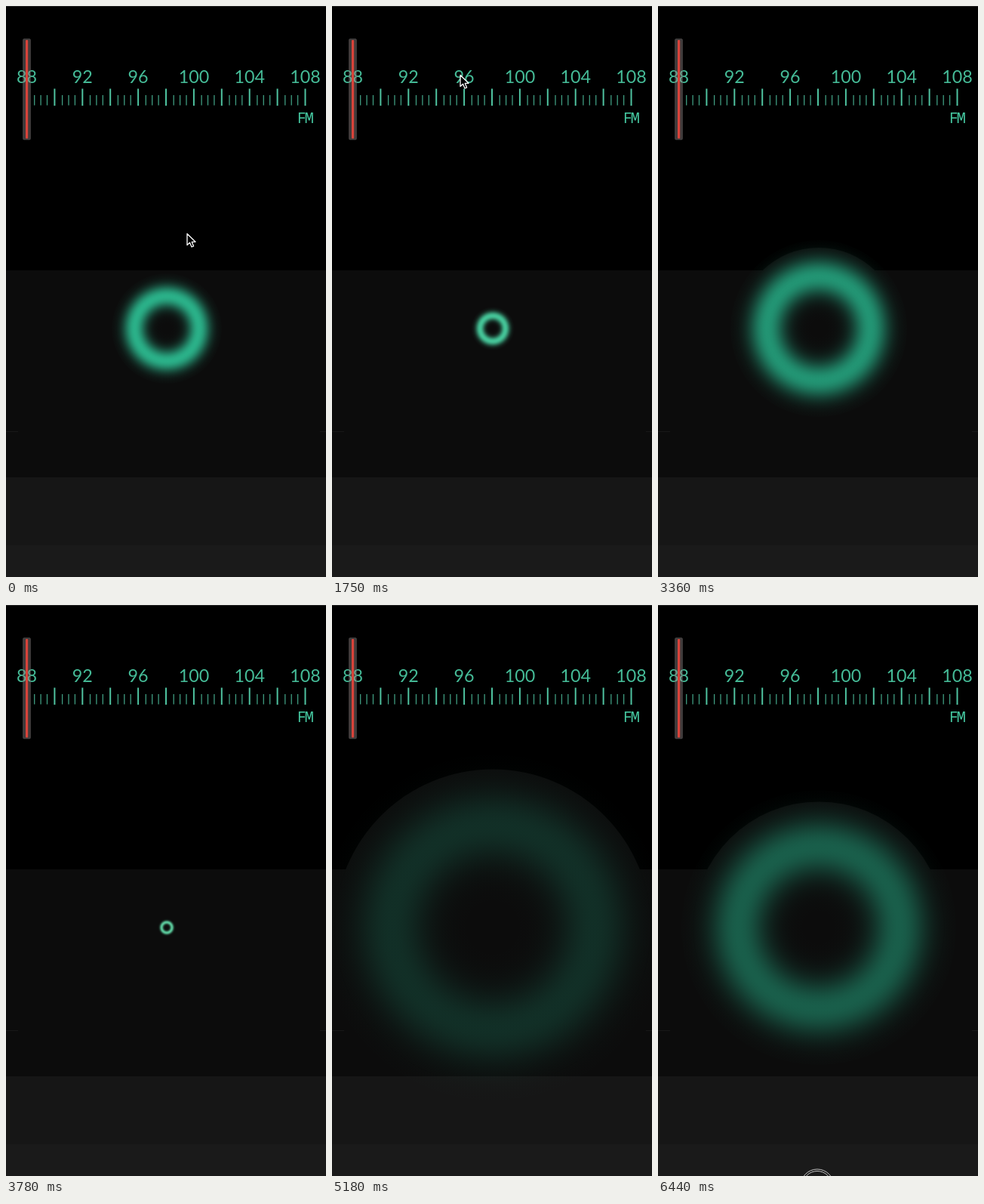
An HTML page that plays this animation: 424x756 px, repeating every 6.51 s.

```html
<!DOCTYPE html>
<html lang="en">
<head>
<meta charset="utf-8">
<title>FM tuner</title>
<style>
  html, body { margin: 0; width: 100%; height: 100%; overflow: hidden; background: #000; }
  svg { display: block; width: 100vw; height: 100vh; }
  .label { font: 400 23.3px Lato, sans-serif; fill: #45bb97; text-anchor: middle; }
  .band { font: 500 20px "Noto Sans Mono", monospace; letter-spacing: -2.2px; fill: #45c7a0; }
</style>
</head>
<body>
<svg viewBox="0 0 424 756">
  <defs>
    <radialGradient id="glow" gradientUnits="userSpaceOnUse" cx="0" cy="0" r="260"></radialGradient>
  </defs>
  <rect width="424" height="756"/>
  <rect width="424" height="1" fill="#252525"/>
  <rect y="350" width="424" height="274" fill="#0c0c0c"/>
  <circle id="backing" r="238" fill="#0c0c0c"/>
  <path d="M0 563.5H16M416 563.5H424" stroke="#181818"/>
  <rect y="624" width="424" height="90" fill="#161616"/>
  <rect y="714" width="424" height="42" fill="#1a1a1a"/>
  <circle id="ring" r="260" fill="url(#glow)"/>
  <g id="scale"></g>
  <text class="band" x="386" y="154.5">FM</text>
  <rect x="22.5" y="43.5" width="10" height="133.5" rx="1.5" fill="#9a8e8e" fill-opacity=".42" stroke="#555" stroke-opacity=".5"/>
  <rect x="26" y="45" width="3.2" height="130.5" rx="1" fill="#d8433a"/>
  <path id="cursor" d="M0 .5V15.5L3.5 12.3 6 18 8.6 16.9 6.2 11.3H11Z" fill="#000" stroke="#fff" stroke-width="1.3" stroke-linejoin="round"/>
  <g id="knob" fill="none" stroke="#c4c4c4">
    <circle cx="211" cy="769" r="22"/>
    <circle cx="211" cy="769" r="19.5"/>
  </g>
</svg>
<script>
const LOOP = 6510, STEP = 70;
const byId = id => document.getElementById(id);

function add(parent, tag, attrs, text = "") {
  const node = document.createElementNS("http://www.w3.org/2000/svg", tag);
  for (const key in attrs) node.setAttribute(key, attrs[key]);
  node.textContent = text;
  return parent.appendChild(node);
}

// A long mark every 2 MHz, with three short ones packed between.
function buildScale() {
  const scale = byId("scale");
  for (let i = 0; i <= 10; i++) {
    const x = 27.5 + i * 36.9;
    add(scale, "path", { d: `M${x} 109.5V132`, stroke: "#4fc3a0", "stroke-width": 2 });
    if (i % 2 === 0) add(scale, "text", { class: "label", x, y: 102.3 }, 88 + i * 2);
    for (let k = 0; k < 3 && i < 10; k++) {
      add(scale, "path", { d: `M${x + 10.2 + k * 8.4} 118V131.5`, stroke: "#3f9c80", "stroke-width": 1.3 });
    }
  }
}

// Soft ring: the glow peaks at radius 152 and falls off on both sides.
function buildGlow() {
  const stops = [];
  for (let r = 20; r <= 260; r += 8) {
    const alpha = Math.exp(-(Math.abs((r - 152) / 54) ** 2.1));
    stops.push(add(byId("glow"), "stop", { offset: r / 260, "stop-opacity": alpha.toFixed(3) }));
  }
  return stops;
}

// Piecewise linear track of [time, ...values]; null outside its span.
function track(points, t) {
  for (let i = 1; i < points.length; i++) {
    const [a, b] = [points[i - 1], points[i]];
    if (t >= a[0] && t <= b[0]) {
      const k = (t - a[0]) / (b[0] - a[0]);
      return a.slice(1).map((v, j) => v + (b[j + 1] - v) * k);
    }
  }
  return null;
}

// Pulse count over time; the fraction is the ring's scale.
const pulses = [[0, .28], [1750, 3.11], [2240, 3.81], [3360, 5.45], [4620, 7.235], [5180, 7.88], [6440, 9.7]];
const cursorPaths = [
  [[0, 240, 301], [1750, 170, 91], [2100, 118, 46], [2240, 101.5, 35], [2380, 84, -19]],
  [[4550, 36, 695], [4620, 46.5, 598]]
];

function draw(t) {
  const size = track(pulses, t)[0] % 1;
  const ring = byId("ring");
  for (const node of [ring, byId("backing")]) {
    node.setAttribute("transform", `translate(213 427) scale(${size})`);
  }
  ring.setAttribute("opacity", 1 - size ** 1.6);
  const red = Math.round(42 + 70 * (1 - size) ** 8);
  for (const stop of stops) stop.setAttribute("stop-color", `rgb(${red},201,155)`);

  const spot = cursorPaths.map(path => track(path, t)).find(Boolean);
  const cursor = byId("cursor");
  cursor.setAttribute("visibility", spot ? "visible" : "hidden");
  if (spot) cursor.setAttribute("transform", `translate(${spot})`);
  byId("knob").setAttribute("visibility", t >= 6440 ? "visible" : "hidden");
}

buildScale();
const stops = buildGlow();
const start = performance.now();
function tick() {
  const t = (performance.now() - start) % LOOP;
  draw(Math.floor(t / STEP) * STEP);
  requestAnimationFrame(tick);
}
tick();
</script>
</body>
</html>
```
